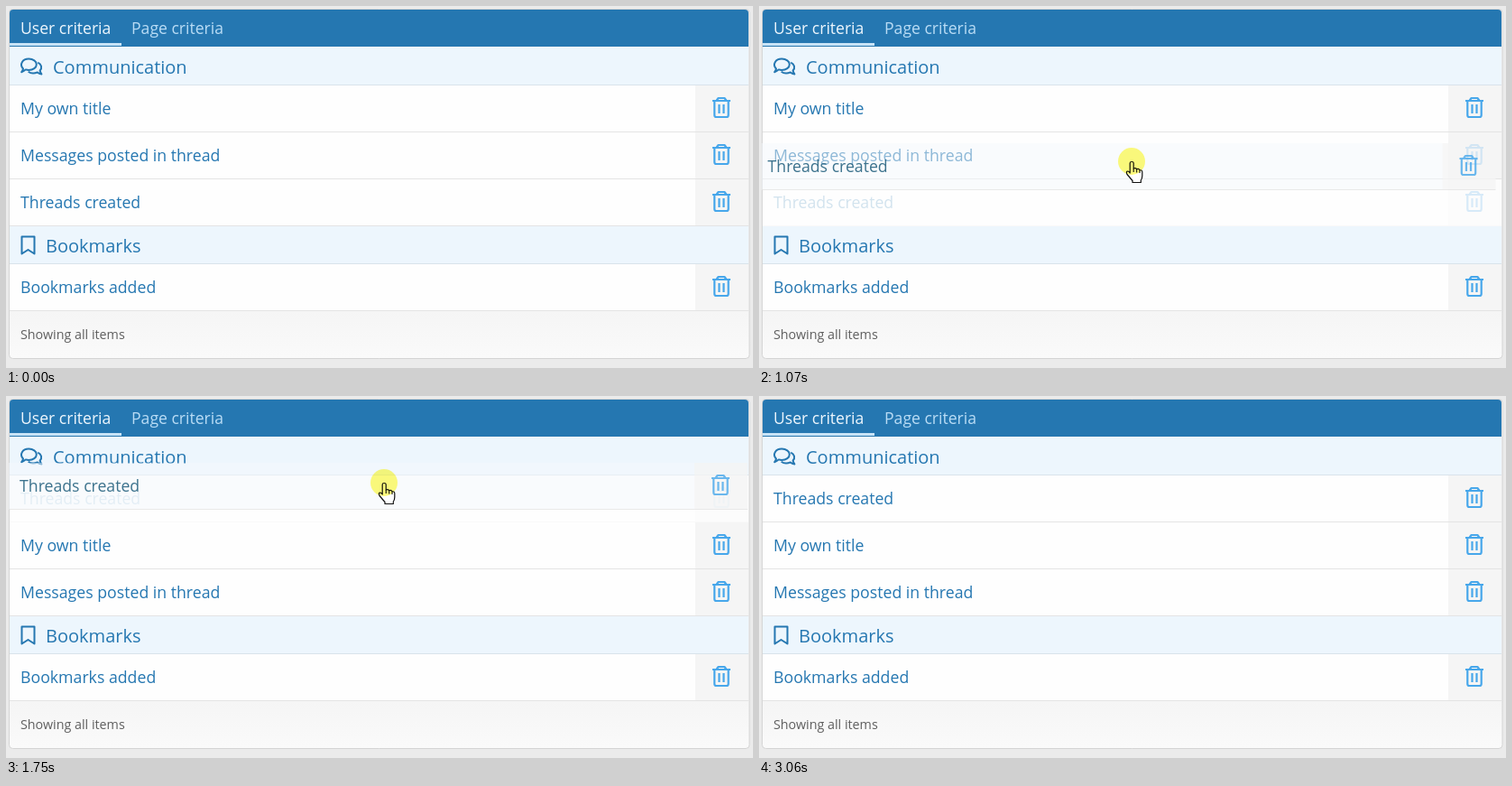
Write an HTML page with a canvas that moves like this. It is 828 px wide and 401 px high and loops after 3690 ms.

```html
<!DOCTYPE html>
<html lang="en">
<head>
<meta charset="utf-8">
<title>Sortable criteria</title>
<style>
  html, body { margin: 0; width: 100%; height: 100%; overflow: hidden; background: #ebebeb; }
  canvas { display: block; }
</style>
</head>
<body>
<canvas id="stage" width="828" height="401"></canvas>
<script>
const ctx = document.getElementById('stage').getContext('2d');
const LOOP = 3690;
const BLUE = '#2577b1', LIGHT_BLUE = '#47a7eb', HOVER = '#0d5070', PALE = '#edf6fd';
const ROW_TOPS = [88, 140, 192], LAST_ROW = 286, ROW_HEIGHT = 51;
const [TITLE, MESSAGES, THREADS] = ['My own title', 'Messages posted in thread', 'Threads created'];

// Bursts of movement: first change, last change, number of changes.
const BURSTS = [[70, 530, 7], [700, 1150, 7], [1230, 1750, 8], [2060, 2060, 1], [2230, 2750, 8], [2830, 3060, 4]];

// Keyframes: time, x, y.
const POINTER = [
  [70, 729, 386], [300, 545, 275], [453, 440, 222], [530, 421, 214], [775, 421, 215],
  [1075, 413, 172], [1150, 413, 163], [1453, 416, 111], [1750, 419, 96], [2060, 419, 96],
  [2230, 431, 102], [2527, 577, 209], [2750, 701, 299], [2830, 718, 317], [2983, 766, 382]
];
const DRAG = [[775, 0, 0], [1075, -6.5, -40], [1150, -6.5, -49], [1453, -6, -95], [1750, -1, -118]];

const HAND = new Path2D('M-1.8 13V2Q-1.8 .5 .2 .5Q2.2 .5 2.2 2V8Q4.5 6.8 5.7 8.7Q8 7.8 9 9.8Q11.8 9.4 11.8 12V16Q11.8 19 10.3 21V23.5H1V21.5L-5 14.5Q-6.5 11 -4.2 11Q-3 11 -1.8 13Z');
const FINGERS = new Path2D('M2.2 8V12M5.7 9V12.4M9 10V13');
const ARROW = new Path2D('M.5 .5V18L4.5 14.3L7.3 20.5L10 19.3L7.3 13.2H12.5Z');
const TRASH = new Path2D('M783 105H803M787.7 104.5L789.6 102H796.4L798.3 104.5M785.3 105.5V121Q785.3 123 787.3 123H798.7Q800.7 123 800.7 121V105.5M790.5 109V119M795.5 109V119');
const BUBBLES = new Path2D('M17.2 73.2Q18.6 71.7 19 69.5C14.5 64.5 18.3 58.6 25.2 58.6C30.2 58.6 33.8 61.2 33.8 64.7C33.8 68.2 30.2 70.9 25.2 70.9Q23.4 70.9 21.8 70.4Q19.9 72.4 17.2 73.2ZM35.3 62.7C39.5 64.5 40.3 68.8 37.6 71.5Q38 73.7 39.4 75.4Q36.7 75 34.9 73.4C30.8 75.3 26.6 74.2 24.7 72.7');
const BOOKMARK = new Path2D('M17.5 255.5H31.5V274.5L24.5 270L17.5 274.5Z');

function rect(x, y, w, h, color) {
  ctx.fillStyle = color;
  ctx.fillRect(x, y, w, h);
}

function text(label, x, y, size, color) {
  ctx.font = `${size}px "Open Sans", "Noto Sans", sans-serif`;
  ctx.fillStyle = color;
  ctx.fillText(label, x, y);
}

function outline(path, color, width) {
  ctx.strokeStyle = color;
  ctx.lineWidth = width;
  ctx.stroke(path);
}

function snap(t) {
  const burst = BURSTS.filter(b => b[0] <= t).pop();
  if (!burst) return 0;
  const [start, end, count] = burst;
  const step = (end - start) / (count - 1) || 1;
  return start + Math.min(count - 1, Math.floor((t + 8 - start) / step)) * step;
}

function sample(keys, t) {
  const next = keys.findIndex(k => k[0] > t);
  if (next === 0) return keys[0].slice(1);
  if (next < 0) return keys[keys.length - 1].slice(1);
  const a = keys[next - 1], b = keys[next], f = (t - a[0]) / (b[0] - a[0]);
  return [a[1] + (b[1] - a[1]) * f, a[2] + (b[2] - a[2]) * f];
}

function row(label, top, { hover = false, alpha = 1, fill = alpha } = {}) {
  ctx.save();
  ctx.globalAlpha = fill;
  rect(4, top, 760, ROW_HEIGHT, hover ? '#f5f9fe' : '#fefefe');
  ctx.globalAlpha = alpha;
  rect(764, top, 59, ROW_HEIGHT, '#f5f5f5');
  rect(4, top + ROW_HEIGHT, 819, 1, '#e4e4e4');
  text(label, 16, top + 32, 17.7, hover ? HOVER : BLUE);
  ctx.translate(0, top - 88);
  outline(TRASH, LIGHT_BLUE, 2.2);
  ctx.restore();
}

function heading(label, x, top, icon) {
  rect(4, top, 819, 42, PALE);
  rect(4, top + 41, 819, 1, '#d9e3eb');
  text(label, x, top + 29, 20, BLUE);
  outline(icon, BLUE, 2);
}

function panel() {
  rect(0, 0, 828, 401, '#ebebeb');
  ctx.beginPath();
  ctx.roundRect(3.5, 3.5, 820.5, 387, 4);
  const shade = ctx.createLinearGradient(0, 338, 0, 390);
  shade.addColorStop(0, '#f5f5f5');
  shade.addColorStop(1, '#fafafa');
  ctx.fillStyle = shade;
  ctx.fill();
  ctx.strokeStyle = '#d4d4d4';
  ctx.lineWidth = 1;
  ctx.stroke();

  ctx.beginPath();
  ctx.roundRect(4, 4, 819, 41, [4, 4, 0, 0]);
  ctx.fillStyle = BLUE;
  ctx.fill();
  text('User criteria', 16, 31, 17.6, PALE);
  text('Page criteria', 139, 31, 17.6, '#b9dcf5');
  rect(4, 41, 124, 3, '#c7e3f7');

  heading('Communication', 52, 46, BUBBLES);
  heading('Bookmarks', 44, 244, BOOKMARK);
  text('Showing all items', 16, 369, 14.3, '#5f5f5f');
}

function pointer(x, y, isHand, pressed) {
  ctx.save();
  ctx.translate(x, y);
  const shape = isHand ? HAND : ARROW;
  ctx.fillStyle = '#fff';
  ctx.fill(shape);
  outline(shape, '#111', 1.2);
  if (isHand) outline(FINGERS, '#111', 1.1);
  if (pressed) {
    ctx.globalCompositeOperation = 'multiply';
    ctx.fillStyle = '#fffc7c';
    ctx.beginPath();
    ctx.arc(0, 0, 15, 0, 2 * Math.PI);
    ctx.fill();
  }
  ctx.restore();
}

function draw(time) {
  const t = snap(time);
  const visible = t >= 70 && t < 3050;
  const pressed = t >= 700 && t < 2060;
  const dragging = t >= 840 && t < 2060;
  const [x, y] = sample(POINTER, t);
  const over = top => visible && y >= top && y <= top + ROW_HEIGHT;
  const order = t < 1150 ? [TITLE, MESSAGES, THREADS]
    : t < 1500 ? [TITLE, THREADS, MESSAGES]
    : [THREADS, TITLE, MESSAGES];

  panel();
  order.forEach((label, i) => {
    const top = ROW_TOPS[i];
    if (dragging && label === THREADS) {
      rect(4, top, 819, ROW_HEIGHT + 1, '#fefefe');
      row(label, top, { alpha: 0.2 });
    } else {
      row(label, top, { hover: !dragging && over(top) });
    }
  });
  row('Bookmarks added', LAST_ROW, { hover: over(LAST_ROW) });

  if (dragging) {
    ctx.save();
    ctx.beginPath();
    ctx.rect(3, 0, 821, 401);
    ctx.clip();
    ctx.translate(...sample(DRAG, t));
    row(THREADS, ROW_TOPS[2], { hover: true, alpha: 0.8, fill: 0.5 });
    ctx.restore();
  }
  if (visible) pointer(x, y, pressed || [...ROW_TOPS, LAST_ROW].some(over), pressed);
}

ctx.lineJoin = 'round';
const begin = performance.now();
function tick() {
  draw((performance.now() - begin) % LOOP);
  requestAnimationFrame(tick);
}
tick();
</script>
</body>
</html>
```
